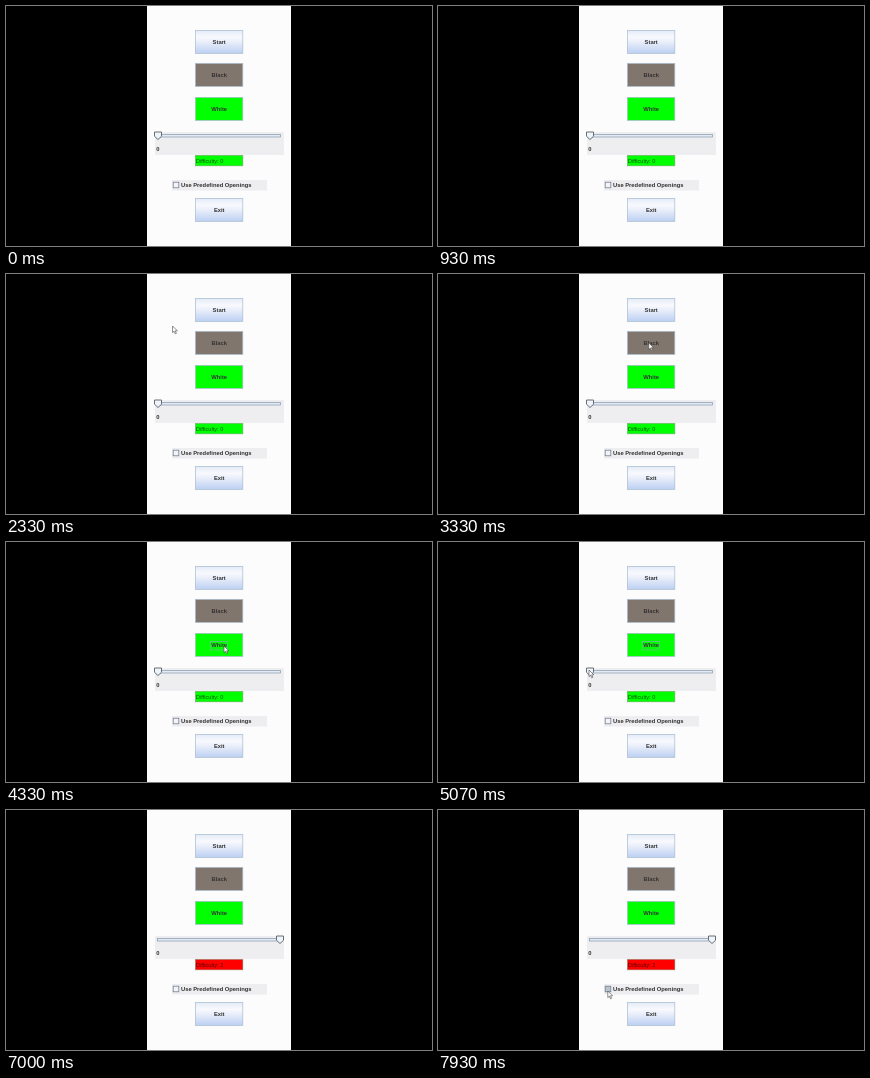
Animation, 426 px wide and 240 px high, one loop 8 s. Source, as an HTML page:

```html
<!DOCTYPE html>
<html lang="en">
<head>
<meta charset="utf-8">
<title>Game options</title>
<style>
  html, body { margin: 0; width: 100%; height: 100%; overflow: hidden; background: #000; }
  svg { display: block; width: 100%; height: 100%; }
  text { font: bold 5.8px "Liberation Sans", Arial, sans-serif; fill: #333; }
  .mid { text-anchor: middle; }
  #level { font-weight: normal; font-size: 5.6px; fill: #000; fill-opacity: .68; }
  .button { stroke: #a9bcd0; stroke-width: .7; }
</style>
</head>
<body>
<svg viewBox="0 0 426 240">
  <defs>
    <linearGradient id="metal" x2="0" y2="1">
      <stop offset="0" stop-color="#e3ecf8"/>
      <stop offset=".3" stop-color="#f8f9fd"/>
      <stop offset=".5" stop-color="#e9eefa"/>
      <stop offset="1" stop-color="#bdd0f2"/>
    </linearGradient>
    <clipPath id="panel"><rect x="141" width="144" height="240"/></clipPath>
  </defs>
  <rect width="426" height="240"/>
  <g clip-path="url(#panel)">
    <rect x="141" width="144" height="240" fill="#fcfcfc"/>
    <g id="buttons"></g>
    <rect id="focus" x="204.5" y="99.5" width="17" height="8.5" fill="none" stroke="#78b4a0" stroke-width=".7"/>

    <rect x="149" y="126" width="129" height="23" fill="#eeeef1"/>
    <rect x="151.5" y="128.4" width="123" height="2.6" fill="#e4ebf4" stroke="#8397ad" stroke-width=".7"/>
    <path id="thumb" d="M-3.5-3.5h7V.8L0 4-3.5.8z" fill="#f0f3f8" stroke="#56616d" stroke-width=".9"/>
    <text x="150.3" y="145">0</text>

    <rect id="meter" x="189.3" y="149.3" width="47.6" height="10.6" stroke="#8a9a80" stroke-width=".5"/>
    <text id="level" x="190" y="157"></text>

    <rect x="166" y="174" width="95" height="10.5" fill="#eeeef1"/>
    <rect id="box" x="167.2" y="176.2" width="5.6" height="5.6" stroke="#75818f" stroke-width=".8"/>
    <text x="175" y="181.2">Use Predefined Openings</text>

    <path id="cursor" d="M0 0V6.6L1.6 5.2 2.7 7.8 3.8 7.3 2.7 4.8H4.8z" fill="#fff" stroke="#444" stroke-width=".6"/>
  </g>
</svg>
<script>
const LOOP = 8000;
const $ = id => document.getElementById(id);

const buttons = [
  ["Start", 24, "url(#metal)"],
  ["Black", 57, "#80766e"],
  ["White", 91, "#0f0"],
  ["Exit", 192, "url(#metal)"]
];
$("buttons").innerHTML = buttons.map(([label, y, fill]) =>
  `<rect class="button" x="189.4" y="${y + .4}" width="47.4" height="23" fill="${fill}"/>
   <text class="mid" x="213.2" y="${y + 14.3}">${label}</text>`).join("");

const levels = ["#0f0", "#ff0", "#f00"];

// Time, x, y
const cursorPath = [
  [1800, 136, 36], [2330, 166.5, 52], [2900, 204, 66], [3350, 211, 69],
  [3900, 216, 98], [4200, 218, 104], [4600, 218, 104], [5050, 151, 128],
  [5200, 151, 128], [5800, 199, 127], [6500, 273, 128], [6650, 273, 128],
  [6900, 290, 134], [7050, 290, 140], [7700, 172, 179], [7930, 169.8, 181]
];
const thumbPath = [[5200, 152], [5800, 200], [6500, 274]];

function sample(path, time) {
  if (time <= path[0][0]) return path[0].slice(1);
  const next = path.findIndex(point => point[0] > time);
  if (next < 0) return path[path.length - 1].slice(1);
  const a = path[next - 1], b = path[next];
  const k = (time - a[0]) / (b[0] - a[0]);
  return a.slice(1).map((v, i) => v + (b[i + 1] - v) * k);
}

function place(id, x, y) {
  $(id).setAttribute("transform", `translate(${x} ${y})`);
}

function draw(time) {
  const [x] = sample(thumbPath, time);
  const level = Math.round((x - 152) / 122 * 2);
  place("thumb", x, 129.5);
  place("cursor", ...sample(cursorPath, time));
  $("meter").setAttribute("fill", levels[level]);
  $("level").textContent = `Difficulty: ${level}`;
  $("focus").style.visibility = time >= 4200 && time < 5200 ? "visible" : "hidden";
  $("box").setAttribute("fill", time >= 7870 ? "#b8c4d0" : "#f2f4f8");
}

const start = performance.now();
function tick() {
  draw((performance.now() - start) % LOOP);
  requestAnimationFrame(tick);
}
tick();
</script>
</body>
</html>
```
